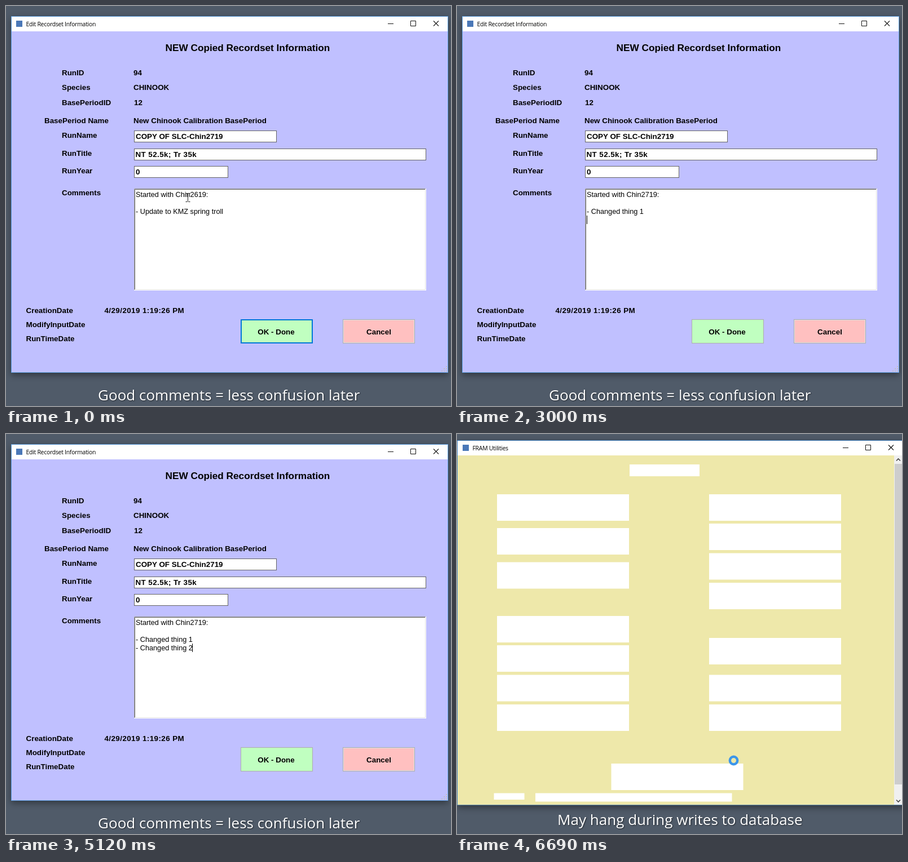
Animation, 789 px wide and 710 px high, one loop 8 s. Source, as an HTML page:

```html
<!DOCTYPE html>
<html lang="en">
<head>
<meta charset="utf-8">
<title>Edit Recordset Information</title>
<style>
  html, body { margin: 0; width: 100%; height: 100%; overflow: hidden; background: #505b69; }
  svg { display: block; width: 100vw; height: 100vh; }
  text { white-space: pre; }
  .shadow { filter: drop-shadow(0 4px 6px rgba(0, 0, 0, .4)); }
  .label { font: bold 13.4px "Liberation Sans", Arial, sans-serif; }
  .num { letter-spacing: .42px; }
  .heading { font: bold 17.23px "Liberation Sans", Arial, sans-serif; }
  .note { font: 12.7px "Liberation Sans", Arial, sans-serif; }
  .title { font: 10.4px "Open Sans", "Noto Sans", sans-serif; letter-spacing: -.24px; }
  .caption { font: 500 26px "Open Sans", "Noto Sans", sans-serif; fill: #fff; text-shadow: 1px 1px 2px rgba(0, 0, 0, .55); }
  .mid { text-anchor: middle; }
  .field rect { fill: #fff; stroke: #646464; }
</style>
</head>
<body>
<svg viewBox="0 0 789 710">
  <defs>
    <g id="controls" fill="none" stroke="#111">
      <path d="M677 31.5h10M717.5 26.5h9v9h-9z"/>
      <path d="M758 26.5l9 9m0-9l-9 9" stroke-width="1.1"/>
    </g>
    <rect id="icon" x="18" y="26" width="11" height="11" fill="#4a78b8"/>
  </defs>
  <rect width="789" height="710" fill="#505b69"/>

  <g id="editor">
    <rect class="shadow" x="9" y="18" width="775" height="633" fill="#c0c0ff"/>
    <rect x="9.5" y="18.5" width="774" height="632" fill="#c0c0ff" stroke="#5e9fe0"/>
    <rect x="10" y="19" width="773" height="26" fill="#fff"/>
    <path d="M772 648h10M776 644h6M780 640h2" stroke="#bfbfbf" stroke-width="2" stroke-dasharray="2"/>
    <use href="#icon"/>
    <use href="#controls"/>
    <text class="title" x="35.5" y="35.5">Edit Recordset Information</text>
    <text class="heading" x="282.5" y="80">NEW Copied Recordset Information</text>

    <g class="field">
      <rect x="227.5" y="221.5" width="252" height="20"/>
      <rect x="227.5" y="253.5" width="517" height="20"/>
      <rect x="227.5" y="284.5" width="166" height="20"/>
    </g>
    <rect x="227" y="324" width="518" height="181" fill="#fff"/>
    <path d="M227.5 504V324.5H744" fill="none" stroke="#a0a0a0"/>
    <path d="M228.5 503V325.5H743" fill="none" stroke="#696969"/>
    <path d="M228 503.5H743.5V325" fill="none" stroke="#e3e3e3"/>
    <g id="labels" class="label"></g>

    <rect id="ok" fill="#c0ffc0"/>
    <rect x="597.5" y="556.5" width="127" height="42" fill="#ffc0c0" stroke="#adadad"/>
    <rect x="598.5" y="557.5" width="125" height="40" fill="none" stroke="#e1e1e1"/>
    <text class="label mid" x="479" y="583">OK - Done</text>
    <text class="label mid" x="661" y="583">Cancel</text>

    <g class="note">
      <rect id="selection" y="357" height="15" fill="#0078d7"/>
      <text id="line0" y="339"></text>
      <text id="line2" y="369"></text>
      <text id="line3" y="384"></text>
      <text id="rest" y="369">Update to KMZ spring troll</text>
      <rect id="caret" width="1" height="15"/>
    </g>

    <circle id="click" r="10.5" fill="#eee000"/>
    <path id="ibeam" d="M-4 -7.5h3l1 1l1 -1h3M0 -6.5v13M-4 7.5h3l1 -1l1 1h3" fill="none" stroke="#222"/>
    <path id="arrow" d="M.5 .5v15l3.5 -3.3l2.4 5.6l2.2 -1l-2.4 -5.4h4.8z" fill="#fff" stroke="#111"/>
    <text class="caption" x="163" y="700">Good comments = less confusion later</text>
  </g>

  <g id="utilities">
    <rect class="shadow" x="1" y="11" width="800" height="648" fill="#eee8aa"/>
    <path d="M.5 659V11.5H789" fill="none" stroke="#3d7fbf"/>
    <path d="M0 658.5H789" stroke="#5b87a8"/>
    <rect x="1" y="12" width="788" height="26" fill="#fff"/>
    <use href="#icon" x="-8" y="-7"/>
    <use href="#controls" x="7" y="-7"/>
    <text class="title" x="27.5" y="28.5">FRAM Utilities</text>
    <g id="panels" fill="#fff"></g>
    <rect x="775" y="38" width="14" height="620" fill="#f0f0f0"/>
    <rect x="776" y="53" width="13" height="569" fill="#cdcdcd"/>
    <path d="M779 47.5l3.5 -3.5l3.5 3.5M779 649.5l3.5 3.5l3.5 -3.5" fill="none" stroke="#444" stroke-width="1.6"/>
    <circle cx="490.5" cy="579.5" r="6.7" fill="none" stroke="#3c96ea" stroke-width="4.4"/>
    <text class="caption" x="178" y="694">May hang during writes to database</text>
  </g>
</svg>
<script>
const LOOP = 8000;
const $ = id => document.getElementById(id);
const set = (el, attrs) => { for (const k in attrs) el.setAttribute(k, attrs[k]); };
const show = (el, on) => { el.style.display = on ? '' : 'none'; };
const add = (parent, tag, attrs, text = '') => {
  const el = document.createElementNS('http://www.w3.org/2000/svg', tag);
  set(el, attrs);
  el.textContent = text;
  parent.append(el);
};

[
  [99, 123, 'RunID'], [226, 123, '94'],
  [99, 149, 'Species'], [226, 149, 'CHINOOK'],
  [99, 176, 'BasePeriodID'], [227, 176, '12'],
  [68, 208, 'BasePeriod Name'], [226, 208, 'New Chinook Calibration BasePeriod'],
  [99, 234, 'RunName'], [230, 236, 'COPY OF SLC-Chin2719'],
  [99, 266, 'RunTitle'], [229.5, 268, 'NT 52.5k; Tr 35k', 'num'],
  [99, 297, 'RunYear'], [230, 299, '0'],
  [99, 336, 'Comments'],
  [35.5, 545, 'CreationDate'], [174.5, 545, '4/29/2019 1:19:26 PM', 'num'],
  [35.5, 570, 'ModifyInputDate'], [35.5, 595, 'RunTimeDate']
].forEach(([x, y, text, cls = '']) => add($('labels'), 'text', { x, y, class: cls }, text));

const panel = (x, y, width = 234, height = 47) => add($('panels'), 'rect', { x, y, width, height });
[107, 167, 227.5, 323, 375, 427.5, 480].forEach(y => panel(71, y));
[107, 159, 211.5, 264, 362, 427.5, 480].forEach(y => panel(447, y));
panel(273.5, 585);
panel(306, 54, 124, 21);
panel(65.5, 637.5, 54, 11.5);
panel(139, 637.5, 348.5, 15);

const pen = document.createElement('canvas').getContext('2d');
pen.font = '12.7px "Liberation Sans", Arial, sans-serif';
const widthOf = text => pen.measureText(text).width;

const spread = (from, to, n) => Array.from({ length: n }, (_, i) => from + (to - from) * i / (n - 1));
const typed = (text, times, t) => text.slice(0, times.filter(at => at <= t).length);
const latest = (steps, t) => steps.filter(step => step[0] <= t).pop();

const SELECT = 1790, REPLACE = 1863, NEWLINE = 3000;
const firstKeys = [...spread(REPLACE, 2520, 10), 2610, 2690, 2770, 2770, 2860];
const secondKeys = [3350, 3500, 3570, ...spread(3750, 4240, 7), 4400, 4490, 4570, 4650, 4720, 4870, 5120];

// [time, line, text before the caret]
const INTRO = 'Started with Chin';
const caretMoves = [
  [80, 0, INTRO], [730, 0, INTRO + '2'], [870, 0, INTRO + '27'],
  [940, 1, ''], [1240, 2, ''], [1490, 2, '-'], [1640, 2, '- ']
];
const caretGaps = [[0, 80], [SELECT, REPLACE], [3170, 3350], [5290, 5620], [6390, LOOP]];

// [time, x, y, shape]
const pointerMoves = [
  [0, 322, 340, 'ibeam'], [730, 0, 0, ''],
  [5620, 322, 340, 'ibeam'], [5700, 362, 320, 'ibeam'], [5780, 434, 316, 'ibeam'],
  [5860, 485, 351, 'ibeam'], [5930, 496, 405, 'ibeam'], [6000, 500, 460, 'ibeam'],
  [6080, 499, 514, 'arrow'], [6160, 496, 552, 'arrow'], [6240, 493, 572, 'arrow'],
  [6310, 491, 580, 'arrow']
];
// [time, x, y, opacity]
const clicks = [[0, 0, 0, 0], [80, 321.5, 338, .75], [380, 321.5, 338, .35], [510, 0, 0, 0], [6390, 491, 579, .75]];

const TEXT_X = 230;
for (const id of ['line0', 'line2', 'line3']) set($(id), { x: TEXT_X });
set($('rest'), { x: TEXT_X + widthOf('- ') });
set($('selection'), { x: 238, width: 149 });

function drawNotes(t) {
  const run = t < 800 ? '2619' : t < 870 ? '219' : '2719';
  const line2 = '- ' + typed('Changed thing 1', firstKeys, t);
  const line3 = typed('- Changed thing 2', secondKeys, t);
  const selected = t >= SELECT && t < REPLACE;
  $('line0').textContent = INTRO + run + ':';
  $('line2').textContent = line2;
  $('line3').textContent = line3;
  show($('rest'), t < REPLACE);
  set($('rest'), { fill: selected ? '#fff' : '#000' });
  show($('selection'), selected);

  const [, row, before] = t >= NEWLINE ? [0, 3, line3]
    : t >= REPLACE ? [0, 2, line2]
    : latest(caretMoves, t) || [0, 0, ''];
  set($('caret'), { x: Math.floor(TEXT_X + widthOf(before)), y: 327 + 15 * row });
  show($('caret'), !caretGaps.some(([from, to]) => t >= from && t < to));
}

function drawButton(t) {
  const [stroke, w] = t < 80 ? ['#0078d7', 2]
    : t >= 6390 ? ['#1462a8', 1]
    : t >= 6240 ? ['#0078d7', 1]
    : ['#adadad', 1];
  set($('ok'), { x: 416 + w / 2, y: 556 + w / 2, width: 128 - w, height: 43 - w, stroke, 'stroke-width': w });
}

function drawPointer(t) {
  const [, x, y, shape] = latest(pointerMoves, t);
  for (const id of ['ibeam', 'arrow']) {
    show($(id), id === shape);
    set($(id), { transform: `translate(${x + (id === 'ibeam' ? .5 : 0)} ${y})` });
  }
  const [, cx, cy, opacity] = latest(clicks, t);
  set($('click'), { cx, cy, opacity });
}

function draw(now) {
  const t = now % LOOP;
  const editing = t < 6690;
  show($('editor'), editing);
  show($('utilities'), !editing);
  if (editing) {
    drawNotes(t);
    drawButton(t);
    drawPointer(t);
  }
}

const start = performance.now();
function tick() {
  draw(performance.now() - start);
  requestAnimationFrame(tick);
}
tick();
</script>
</body>
</html>
```
